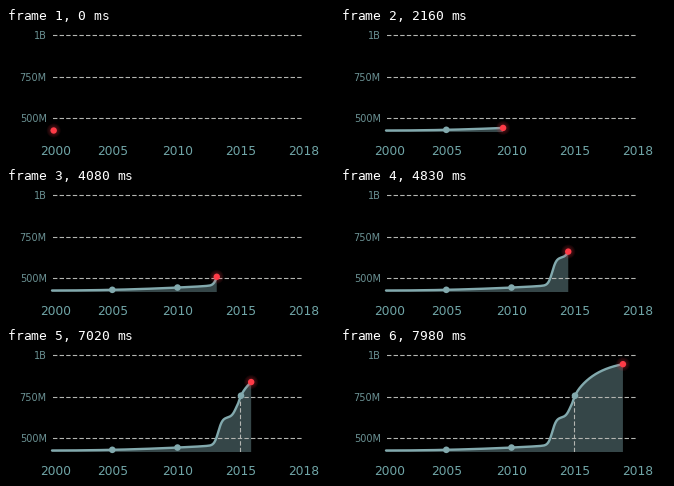
These frames come from a looping animation (328 px wide and 132 px high, 8000 ms). A matplotlib script:

```python
import numpy as np
import matplotlib.pyplot as plt
from matplotlib.animation import FuncAnimation
from matplotlib.patches import Circle

W, H, DPI = 328, 132, 100
LOOP, INTERVAL, STEP = 8000, 20, 30
LEFT, BASE = 46, 104
TEAL, FILL, RED = "#82a9ad", "#354648", "#ff3b47"


def px(size):
    return size * 72 / DPI


def sigmoid(x, mid, width):
    return 1 / (1 + np.exp((mid - x) / width))


def curve(x):
    """Slow growth, two steep steps, then a levelling rise."""
    slow = 4.5 * np.clip((x - LEFT) / 155, 0, 1) ** 2
    steps = 28.5 * sigmoid(x, 212.3, 2.1) + 19 * sigmoid(x, 230, 2.2)
    late = 39 * (1 - np.exp(-np.maximum(x - 232, 0) / 24))
    return 102.5 - slow - steps - late


xs = np.linspace(LEFT, 292, 1500)
ys = curve(xs)
length = np.r_[0, np.cumsum(np.hypot(np.diff(xs), np.diff(ys)))]

# The dot eases along the curve from stop to stop: (start ms, duration ms)
moves = [(0, 900), (1250, 1200), (2570, 3240), (6430, 1950)]
stops = np.interp([47.7, 107, 172, 237, 289], xs, length)


def travelled(t):
    s = stops[0]
    for (start, span), leg in zip(moves, np.diff(stops)):
        u = np.clip((t - start) / span, 0, 1)
        s += leg * (1 - np.cos(np.pi * u)) / 2
    return s


fig = plt.figure(figsize=(W / DPI, H / DPI), dpi=DPI, facecolor="black")
ax = fig.add_axes([0, 0, 1, 1])
ax.set_xlim(0, W)
ax.set_ylim(H, 0)
ax.axis("off")


def dashed(x, y):
    return ax.plot(x, y, color="#b4b6b2", lw=px(1.1), dashes=(4, 2),
                   dash_capstyle="butt", snap=False, zorder=3)[0]


def label(x, y, text, size, color, align):
    ax.text(x, y, text, color=color, fontsize=px(size), ha=align,
            family="DejaVu Sans", va="baseline")


def disc(x, y, r, color, alpha=1, z=5):
    return ax.add_patch(Circle((x, y), r, color=color, alpha=alpha,
                               lw=0, zorder=z))


for text, y in (("1B", 7.5), ("750M", 49.5), ("500M", 90.5)):
    dashed([47, 296.5], [y, y])
    label(40.8, y + 3.7, text, 9.8, "#6b9294", "right")
for year, x in ((2000, 49.5), (2005, 106.5), (2010, 172),
                (2015, 235), (2018, 298)):
    label(x, 127, str(year), 12.3, "#70a5a7", "center")

area, = ax.fill([LEFT] * 3, [BASE] * 3, color=FILL, lw=0, zorder=2)
drop = dashed([234.5, 234.5], [47, BASE])
line, = ax.plot([], [], color=TEAL, lw=px(2.4), solid_capstyle="round",
                solid_joinstyle="round", zorder=4)
markers = [disc(x, curve(x), 3.3, TEAL) for x in (106.3, 171.5, 235)]
dot = [disc(0, 0, r, RED, 0.07, 6) for r in (7, 6, 5, 4)]
dot.append(disc(0, 0, 3.2, RED, 1, 7))


def draw(i):
    s = travelled(i * INTERVAL // STEP * STEP)
    x = np.interp(s, length, xs)
    y = curve(x)
    n = np.searchsorted(length, s)
    px_, py_ = np.r_[xs[:n], x], np.r_[ys[:n], y]
    line.set_data(px_, py_)
    area.set_xy(np.column_stack([np.r_[LEFT, px_, x], np.r_[BASE, py_, BASE]]))
    for m in markers:
        m.set_visible(x >= m.center[0])
    drop.set_visible(x >= 235)
    for c in dot:
        c.center = x, y
    return [area, drop, line, *markers, *dot]


anim = FuncAnimation(fig, draw, frames=LOOP // INTERVAL, interval=INTERVAL,
                     repeat=True, repeat_delay=0)
plt.show()
```
